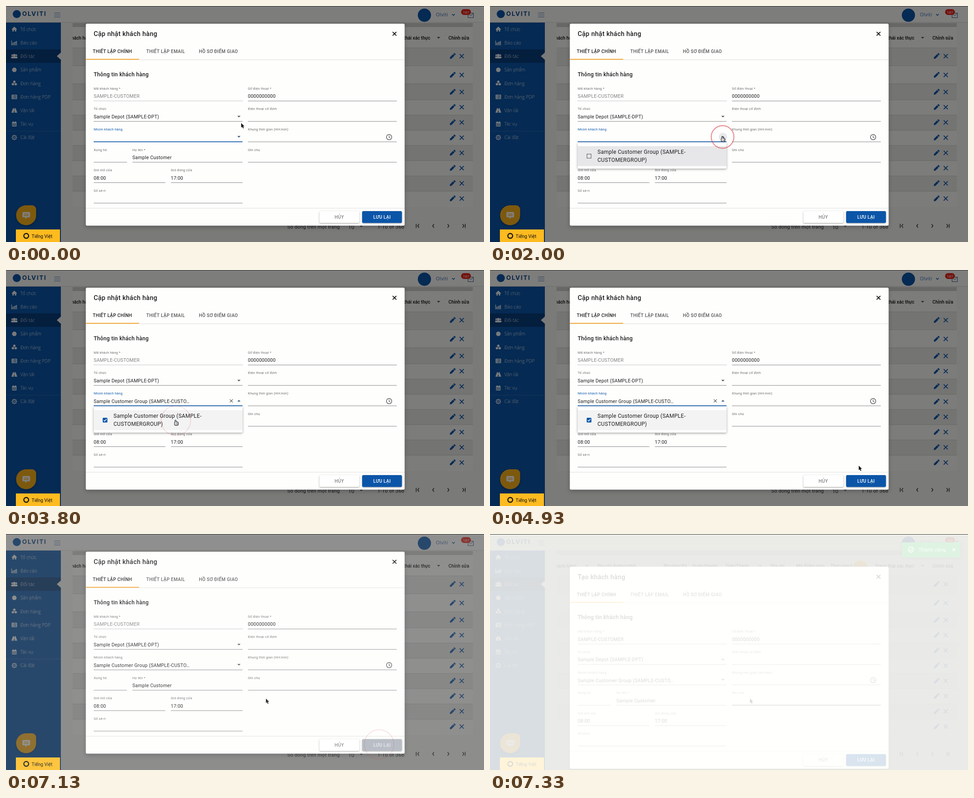
An HTML page with a canvas that plays this animation: 1063 by 527 pixels, repeating every 7400 ms.

```html
<!DOCTYPE html>
<html lang="vi">
<head>
<meta charset="utf-8">
<style>
html, body { margin: 0; width: 100%; height: 100%; overflow: hidden; background: #fff; }
canvas { display: block; }
</style>
</head>
<body>
<canvas id="stage" width="1063" height="527"></canvas>
<script>
const W = 1063, H = 527, LOOP = 7400;
const BLUE = '#0b55a8', INK = '#1c1c1c', GREY = '#6b6b6b', RULE = '#858585';
const main = document.getElementById('stage').getContext('2d');
const layer = document.createElement('canvas');
layer.width = W;
layer.height = H;
const side = layer.getContext('2d');
let g = main;

const clamp = v => Math.max(0, Math.min(1, v));
const span = (t, a, b) => clamp((t - a) / (b - a));
const smooth = v => v * v * (3 - 2 * v);
const times = (n, fn) => { for (let i = 0; i < n; i++) fn(i); };

function text(s, x, y, size, color, weight = 400, gap = 0, family = 'Roboto', align = 'left') {
  g.font = `${weight} ${size}px ${family}, sans-serif`;
  g.letterSpacing = gap + 'px';
  g.textAlign = align;
  g.fillStyle = color;
  g.fillText(s, x, y);
}
const caps = (s, x, y, color, align) => text(s, x, y, 10, color, 500, .35, 'Roboto', align);
const value = (s, x, y, color = INK) => text(s, x, y, 10.5, color, 400, .27);
const label = (s, x, y, color = GREY) => text(s, x, y, 7.5, color, 400, .23);

function box(x, y, w, h, color) {
  g.fillStyle = color;
  g.fillRect(x, y, w, h);
}
function frameBox(x, y, w, h, color, width) {
  g.strokeStyle = color;
  g.lineWidth = width;
  g.strokeRect(x, y, w, h);
}
function round(x, y, w, h, r, color) {
  g.beginPath();
  g.roundRect(x, y, w, h, r);
  g.fillStyle = color;
  g.fill();
}
function disc(x, y, r, color) {
  g.beginPath();
  g.arc(x, y, r, 0, 7);
  g.fillStyle = color;
  g.fill();
}
function ring(x, y, r, color, width) {
  g.beginPath();
  g.arc(x, y, r, 0, 7);
  g.strokeStyle = color;
  g.lineWidth = width;
  g.stroke();
}
function trace(pts, x, y) {
  g.beginPath();
  for (let i = 0; i < pts.length; i += 2) g.lineTo(x + pts[i], y + pts[i + 1]);
}
function poly(pts, x, y, color) {
  trace(pts, x, y);
  g.fillStyle = color;
  g.fill();
}
function line(pts, x, y, color, width) {
  trace(pts, x, y);
  g.strokeStyle = color;
  g.lineWidth = width;
  g.stroke();
}
function cross(x, y, r, color, width) {
  line([-r, -r, r, r], x, y, color, width);
  line([r, -r, -r, r], x, y, color, width);
}
function tick(x, y, color) {
  line([-3, 0, -.8, 2.2, 3.4, -2.4], x, y, color, 1.4);
}
function wedge(x, y, color, up) {
  const d = up ? -1.8 : 1.8;
  poly([-3.6, -d, 3.6, -d, 0, d], x, y, color);
}
function shadowed(blur, alpha, draw) {
  g.save();
  g.shadowColor = `rgba(0,0,0,${alpha})`;
  g.shadowBlur = blur;
  g.shadowOffsetY = blur / 3;
  draw();
  g.restore();
}

// ---- page behind the dialog ----
// Menu icons are drawn around (0, 0).
const menu = {
  'Tổ chức': c => {
    poly([0, -6, 6.5, .5, -6.5, .5], 0, 0, c);
    box(-4.2, 0, 8.4, 5, c);
    box(-1.3, 1.6, 2.6, 3.4, BLUE);
  },
  'Báo cáo': c => {
    line([-6, -5, -6, 4.5, 6.5, 4.5], 0, 0, c, 1.3);
    times(4, i => box(-4.5 + i * 2.8, -i * 1.3, 1.8, 3 + i * 1.3, c));
  },
  'Đối tác': c => times(3, i => {
    const x = (i - 1) * 4.6, r = i === 1 ? 2.9 : 2;
    disc(x, -2.5, r, c);
    round(x - r * 1.3, .3, r * 2.6, 4.4, 2, c);
  }),
  'Sản phẩm': c => disc(0, 0, 5, c),
  'Đơn hàng': c => times(3, i => {
    const a = i * Math.PI * 2 / 3 - Math.PI / 2;
    disc(3.6 * Math.cos(a), 3.6 * Math.sin(a), 2.7, c);
  }),
  'Đơn hàng PDP': c => {
    round(-6, -5, 12, 10, 1.2, c);
    times(3, i => {
      box(-4.2, -3.4 + i * 2.8, 1.4, 1.3, BLUE);
      box(-1.7, -3.4 + i * 2.8, 6, 1.3, BLUE);
    });
  },
  'Vận tải': c => {
    poly([-3, -5, 3, -5, 6.5, 5, -6.5, 5], 0, 0, c);
    box(-.6, -5, 1.2, 3, BLUE);
    box(-.9, 1, 1.8, 4, BLUE);
  },
  'Tác vụ': c => {
    round(-5, -4.5, 10, 10, 1, c);
    times(2, i => box(-3.5 + i * 5.4, -6, 1.6, 2.5, c));
    times(6, i => box(-3.8 + i % 3 * 2.8, -1 + (i / 3 | 0) * 3, 1.9, 2, BLUE));
  },
  'Cài đặt': c => {
    times(8, i => disc(5 * Math.cos(i * Math.PI / 4), 5 * Math.sin(i * Math.PI / 4), 1.1, c));
    ring(0, 0, 4.2, c, 1.1);
    ring(0, 0, 1.8, c, 1);
  }
};

function sidebar() {
  const c = '#f2f5f8';
  box(0, 37, 122, H - 37, BLUE);
  box(0, 97, 122, 30, '#083d7c');
  poly([0, 0, 9, -8, 9, 8], 113, 112, '#f4f4f2');
  box(0, 279, 122, 1, '#2c6bb2');
  Object.entries(menu).forEach(([name, icon], i) => {
    const y = 52 + i * 30.2;
    g.save();
    g.translate(18.5, y);
    icon(c);
    g.restore();
    text(name, 32, y + 3.8, 10.3, c, 300, 0, 'Open Sans');
  });
}

function topBar() {
  box(0, 0, W, 37, '#fbfbf9');
  box(0, 36, W, 1, '#dcdcda');
  disc(24, 18, 9, BLUE);
  text('OLVITI', 36, 22, 13.5, '#0c4687', 700, 1.8, 'Inter');
  times(3, i => box(107, 15 + i * 4.5, 14, 1, '#4e7cb0'));
  disc(930.5, 20.5, 14.7, BLUE);
  text('Olviti', 956, 23, 10.5, '#3b6ca6', 400, .3, 'Open Sans');
  line([-3, -1.5, 0, 1.5, 3, -1.5], 995, 19.5, BLUE, 1.5);
  frameBox(1027.5, 16, 12, 10, '#33557e', 1);
  line([-6, -4, 0, 2, 6, -4], 1033.5, 20, '#33557e', 1);
  round(1012, 7, 22, 13, 6.5, '#e8261c');
  text('187', 1023, 16.5, 8, '#fff', 400, 0, 'Roboto', 'center');
}

const rowY = i => i < 2 ? 112 + 42 * i : 124 + 34 * i;
const rowTop = i => i ? (rowY(i - 1) + rowY(i)) / 2 : 93;
const heads = { 'khách hàng': 140, 'Địa chỉ đường/phố': 239, 'Phường/Xã': 386, 'Quận/Huyện': 450, 'Tỉnh/Thành': 523,
  'Địa chỉ': 624, 'Mã Điểm giao': 681, 'Thời gian t': 757, 'Trạng thái xác thực': 856, 'Chỉnh sửa': 984 };

function pencil(x, y) {
  g.save();
  g.translate(x, y);
  g.rotate(-Math.PI / 4);
  poly([-8.5, 0, -5.5, -2.2, 4, -2.2, 4, 2.2, -5.5, 2.2], 0, 0, BLUE);
  round(5, -2.2, 3, 4.4, .8, BLUE);
  g.restore();
}
function chevron(x, y, dir) {
  line([-1.5 * dir, -4, 1.5 * dir, 0, -1.5 * dir, 4], x, y, '#333', 1.5);
}

function table() {
  box(122, 37, W - 122, H - 37, '#f5f5f3');
  box(148, 38, 890, 9, '#cfcfcd');
  box(148, 47, 890, 402, '#f9f9f7');
  times(10, i => {
    const y = rowTop(i);
    if (i % 2 === 0 && i < 9) box(148, y, 890, rowTop(i + 1) - y, '#eaeae8');
    box(148, y, 890, 1, '#d2d2d0');
    pencil(993, rowY(i));
    cross(1013.5, rowY(i), 4.6, BLUE, 1.7);
  });
  g.save();
  g.beginPath();
  g.rect(148, 47, 890, 46);
  g.clip();
  for (const s in heads) text(s, heads[s], 74.5, 10.2, '#111', 500);
  [216, 601, 962].forEach(x => wedge(x, 71, '#444'));
  g.restore();

  text('Số dòng trên một trang', 625.5, 496.5, 11, '#333', 400, .2);
  text('10', 761, 498, 12, '#333');
  wedge(790, 492, '#555');
  text('1-10 of 368', 826, 496.5, 11.4, '#333', 400, .2);
  times(4, i => chevron(917 + i * 33.3, 491, i < 2 ? -1 : 1));
  times(2, i => box(911.5 + i * 109, 486.5, 1.5, 9, '#333'));
}

function chat() {
  const gold = '#fbb31c';
  shadowed(5, .3, () => round(22.5, 445, 44.5, 44.5, [22, 9, 22, 22], gold));
  round(36.5, 460, 17, 12, 2.5, '#fff');
  poly([0, 0, 5, 0, 0, 4], 43, 471.5, '#fff');
  times(2, i => box(40, 463.8 + i * 3.4, 10, 1.4, gold));
}

function page(saved) {
  table();
  sidebar();
  topBar();
  chat();
  if (saved) disc(824, 76, 17, '#ffb52e');
  box(0, 0, W, H, 'rgba(0,0,0,.5)');
  box(22, 499, 98, 28, '#fdbb1f');
  ring(45, 513.3, 5.3, '#111', 2.4);
  text('Tiếng Việt', 57, 518, 10.3, '#111');
}

// ---- dialog ----
const LEFT = 195, RIGHT = 538, WIDE = 331;
const fieldY = row => 184 + row * 45.6;

function field(row, x, w, name, content = '') {
  const y = fieldY(row);
  label(name, x, y + 2.8);
  value(content, x, y + 21.2);
  box(x, y + 27.6, w, 1, RULE);
}

function codeField(s) {
  label('Mã khách hàng *', LEFT, 186.8);
  value('SAMPLE-CUSTOMER', LEFT, 205.2, s.locked ? '#808080' : INK);
  if (s.locked) times(166, i => box(LEFT + i * 2, 211.5, 1, 1, '#8a8a8a'));
  else box(LEFT, 211.6, WIDE, 1, RULE);
}

function groupField(s) {
  label('Nhóm khách hàng', LEFT, 278, s.focus ? BLUE : GREY);
  if (s.chosen) value('Sample Customer Group (SAMPLE-CUSTO…', LEFT, 297);
  if (s.focus) box(LEFT, 302.4, WIDE, 1.7, BLUE);
  else box(LEFT, 303, WIDE, 1, RULE);
  if (s.halo) disc(518, 292.5, 9.5, '#e9e9e9');
  wedge(518, 292, s.focus ? '#3c5573' : '#555', s.open);
  if (s.chosen && s.focus) cross(501, 292.3, 3.4, '#555', 1.2);
  if (s.caret) box(s.chosen ? 413.4 : LEFT, 286.5, 1.2, 12.5, '#222');
}

function popup(s) {
  g.globalAlpha = s.open;
  shadowed(5, .35, () => round(LEFT, 304.5, WIDE, 58.5, [0, 0, 3, 3], '#fff'));
  box(LEFT, 313, WIDE, 44.5, s.chosen ? '#f3f3f3' : '#e7e6e9');
  text('Sample Customer Group (SAMPLE-', 239, 330.2, 12, INK, 400, .29);
  text('CUSTOMERGROUP)', 239, 347.7, 12, INK, 400, .29);
  if (s.chosen) {
    round(215, 330, 10.5, 10.5, 1.5, BLUE);
    tick(220.2, 335.2, '#fff');
  } else {
    frameBox(215.6, 330.6, 9.2, 9.2, '#666', 1.2);
  }
  g.globalAlpha = 1;
}

function dialog(s) {
  shadowed(10, .25, () => round(177.5, 39.5, 709, 451, 3, '#fefefd'));
  text(s.title, LEFT, 67, 14.4, INK, 500, .32);
  cross(864, 62, 4.2, '#111', 1.8);
  caps('THIẾT LẬP CHÍNH', 193, 105.2, INK);
  caps('THIẾT LẬP EMAIL', 312, 105.2, '#555');
  caps('HỒ SƠ ĐIỂM GIAO', 429, 105.2, '#555');
  box(178, 119.5, 708, 1, '#dedede');
  box(177.5, 118, 118.5, 1.8, '#f7a428');
  text('Thông tin khách hàng', LEFT, 156.5, 12, INK, 500, .32);

  codeField(s);
  field(0, RIGHT, WIDE, 'Số điện thoại *', '0000000000');
  field(1, LEFT, WIDE, 'Tổ chức', 'Sample Depot (SAMPLE-DPT)');
  wedge(518, 247, '#555');
  field(1, RIGHT, WIDE, 'Điện thoại cố định');
  groupField(s);
  field(2, RIGHT, WIDE, 'Khung thời gian (HH:mm)');
  ring(852, 292.8, 5.9, '#444', 1.3);
  line([0, -3.6, 0, .3, 2.6, 2], 852, 292.8, '#444', 1.1);
  field(3, LEFT, 74, 'Xưng hô');
  field(3, 281, 245, 'Họ tên *', 'Sample Customer');
  field(3, RIGHT, WIDE, 'Ghi chú');
  if (!s.locked) box(RIGHT, 348, WIDE, 1.6, '#555');
  field(4, LEFT, 159.5, 'Giờ mở cửa', '08:00');
  field(4, 366.5, 159.5, 'Giờ đóng cửa', '17:00');
  field(5, LEFT, WIDE, 'Số sê-ri');

  box(178, 451, 708, 1, '#dedede');
  shadowed(3, .4, () => round(697, 458, 89, 26.5, 3, '#fff'));
  caps('HỦY', 741.2, 474.8, '#808080', 'center');
  shadowed(3, .35, () => round(792, 458, 88.5, 26.5, 3, s.busy ? '#adb3bd' : BLUE));
  caps('LƯU LẠI', 836.2, 474.8, s.busy ? '#e4e6ea' : '#fff', 'center');
  if (s.open > 0) popup(s);
}

function savedScene() {
  page(true);
  g.save();
  g.translate(0, 33.5);
  dialog({ title: 'Tạo khách hàng', chosen: true, open: 0 });
  g.restore();
  shadowed(6, .25, () => round(916, 18.5, 130, 34, 3, '#35b457'));
  ring(936, 35, 5.8, '#fff', 1.4);
  tick(936.5, 35, '#fff');
  text('Thành công', 953, 39, 11, '#fff', 400, .3);
  cross(1031.5, 35, 3.2, '#fff', 1.3);
}

// ---- pointer ----
// Each move: start, end, then the place it leads to.
const moves = [[60, 260, 516.5, 291], [2200, 2600, 377, 335], [4260, 4930, 820, 437],
  [5130, 5400, 829, 468.5], [6450, 7060, 578, 367.5]];
const clicks = [1400, 2810, 6150];
const blinkStarts = [70, 4010, 5860];
const BLINK = 530;

function pointerAt(t) {
  return moves.reduce(([x, y], [a, b, u, v]) => {
    const k = smooth(span(t, a, b));
    return [x + (u - x) * k, y + (v - y) * k];
  }, [523, 261.5]);
}
function caretShown(t) {
  const start = blinkStarts.filter(s => s <= t).pop();
  return start !== undefined && (t - start) % (2 * BLINK) < BLINK;
}
const inside = (x, y, l, top, w, h) => x >= l && x <= l + w && y >= top && y <= top + h;

function hand(x, y) {
  const shape = (grow, color) => {
    round(x - 1.2 - grow, y - grow, 2.4 + 2 * grow, 9 + 2 * grow, 1.4 + grow, color);
    round(x - 2.2 - grow, y + 4.4 - grow, 8.2 + 2 * grow, 7.4 + 2 * grow, 2.4 + grow, color);
  };
  shape(.6, '#111');
  shape(-.5, '#fff');
  times(3, i => box(x + .5 + i * 1.8, y + 7, .8, 3, '#333'));
}
function arrow(x, y) {
  const pts = [0, 0, 0, 10, 2.3, 7.9, 4, 11.7, 5.8, 10.9, 4.2, 7.3, 7.2, 7.1, 0, 0];
  line(pts, x, y, '#fff', 1.8);
  poly(pts, x, y, '#111');
}

function ripples(t) {
  clicks.forEach(start => {
    const k = (t - start) / 1200;
    if (k <= 0 || k >= 1) return;
    const [x, y] = pointerAt(start);
    const r = 35 * (1 - (1 - k) ** 2);
    g.globalAlpha = 1 - k;
    ring(x + .7, y + 1.3, Math.max(.8, r - 1), '#d81f26', Math.min(r, 3.4 - 2.4 * k));
    g.globalAlpha = 1;
  });
}

function render(t) {
  const swap = span(t, 7150, 7300);
  const wash = span(t, 7090, 7360) * .95;
  const [x, y] = pointerAt(t);
  const busy = t >= 6270, focus = t < 6130;
  g = main;
  page(false);
  dialog({
    title: 'Cập nhật khách hàng',
    locked: true,
    focus, busy,
    halo: Math.hypot(x - 518, y - 292) < 10,
    caret: focus && caretShown(t),
    chosen: t >= 3130,
    open: span(t, 1530, 1650) * (1 - span(t, 6130, 6200))
  });
  ripples(t);
  if (swap > 0) {
    g = side;
    savedScene();
    g = main;
    g.globalAlpha = swap;
    g.drawImage(layer, 0, 0);
    g.globalAlpha = 1;
  }
  const overList = inside(x, y, LEFT, 285, WIDE, 78);
  const overSave = !busy && inside(x, y, 792, 458, 89, 27);
  (overList || overSave ? hand : arrow)(x, y);
  box(0, 0, W, H, `rgba(255,255,253,${wash})`);
  box(0, 0, W, 1, '#333');
}

let begin;
function loop(now) {
  begin ??= now;
  render((now - begin) % LOOP);
  requestAnimationFrame(loop);
}
render(0);
requestAnimationFrame(loop);
</script>
</body>
</html>
```
